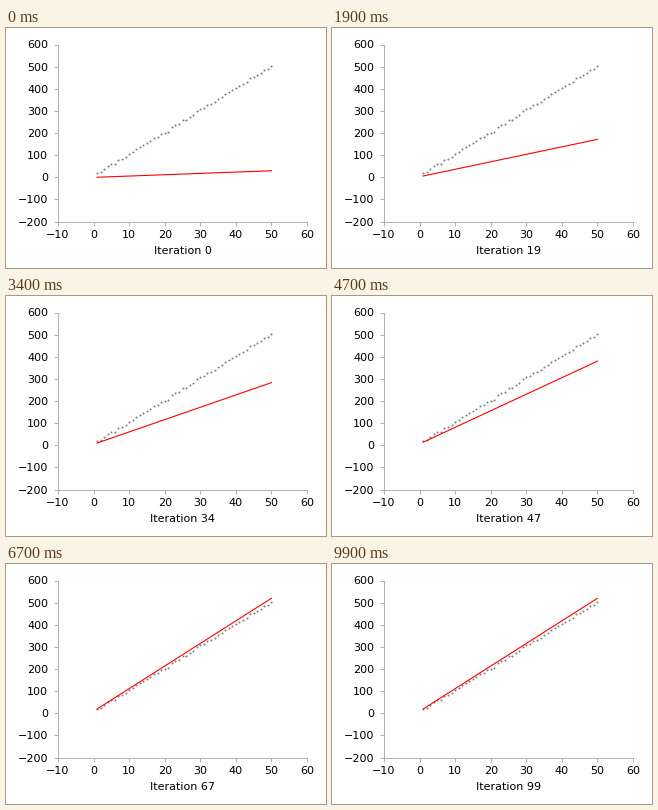
Recreate the animation shown at these times as a matplotlib script. Size 320 px wide and 240 px high, loop 10000 ms.

```python
import numpy as np
import matplotlib.pyplot as plt
from matplotlib.animation import FuncAnimation

FRAMES = 100
GREY = "#aaaaaa"
RATE = 0.1463      # growth of slope and intercept per iteration
CONVERGED = 65.7   # iteration at which the fit stops moving

plt.rcParams.update({"font.family": "DejaVu Sans", "font.size": 10})

np.random.seed(0)
x = np.arange(1, 51)
y = 10 * x + 3.4 + 2.6 * np.random.randn(x.size)

fig, ax = plt.subplots(figsize=(4, 3), dpi=80)
fig.subplots_adjust(left=52 / 320, right=301 / 320,
                    bottom=46.5 / 240, top=223.5 / 240)
ax.set(xlim=(-10, 60), ylim=(-200, 600))
ax.set_xticks(range(-10, 61, 10))
ax.set_yticks(range(-200, 601, 100))
ax.spines[["top", "right"]].set_visible(False)
ax.spines[["left", "bottom"]].set_color(GREY)
ax.tick_params(color=GREY, labelcolor="black")
ax.tick_params(axis="x", pad=4.4)
ax.tick_params(axis="y", pad=5.3)

ax.plot(x, y, ".", ms=2, mew=0.8, color="grey")
fit, = ax.plot([], [], color="red", lw=1)
label = ax.set_xlabel("Iteration 0", labelpad=5)


def update(step):
    gain = RATE * min(step, CONVERGED)
    slope, intercept = 0.6 + gain, -0.6 + gain
    fit.set_data(x, slope * x + intercept)
    label.set_text(f"Iteration {step}")
    return fit, label


anim = FuncAnimation(fig, update, frames=FRAMES, interval=100,
                     repeat=True, repeat_delay=0, blit=False)
plt.show()
```
